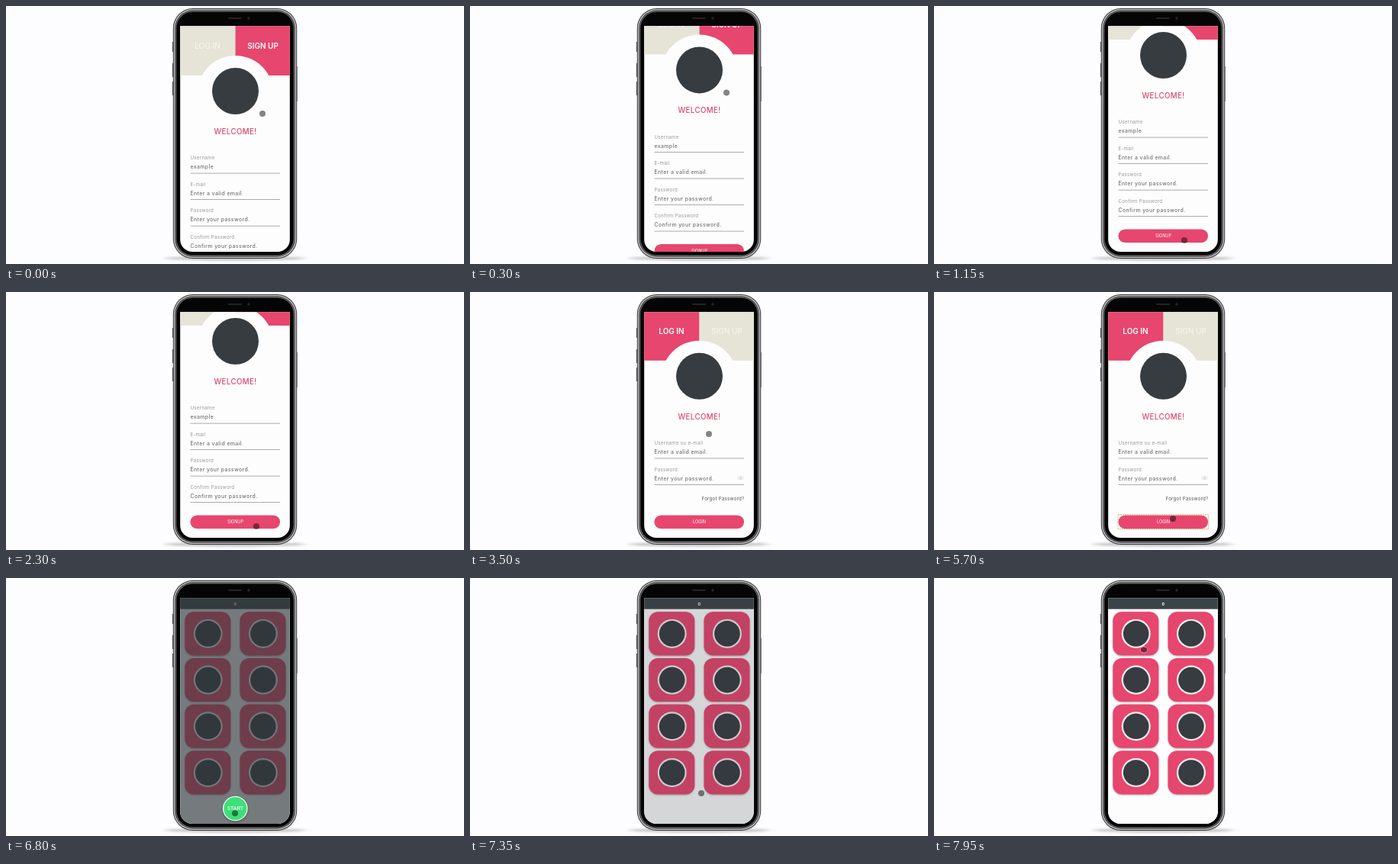
Write an HTML page that moves like this. It is 600 px wide and 338 px high and loops after 8000 ms.

```html
<!DOCTYPE html>
<html lang="en">
<head>
<meta charset="utf-8">
<title>Sign up, log in, play</title>
<style>
html, body { margin: 0; width: 100%; height: 100%; overflow: hidden; background: #fdfcfe; }
svg { display: block; width: 100vw; height: 100vh; }
text { font-family: Inter, "Open Sans", sans-serif; }
.tab { font-size: 10px; fill: #f8f7f0; text-anchor: middle; }
.on { font-weight: 600; fill: #fff; }
.hello { font-size: 9.7px; font-weight: 500; letter-spacing: .4px; fill: #d8486b; text-anchor: middle; }
.label { font-size: 6.2px; letter-spacing: .25px; fill: #98969a; }
.value { font-size: 6.9px; font-weight: 500; letter-spacing: .4px; fill: #727074; }
.forgot { font-size: 6.2px; letter-spacing: .22px; fill: #555; text-anchor: end; }
.button { font-size: 5.6px; fill: #fff; text-anchor: middle; }
.score { font: 700 6px Roboto, sans-serif; fill: #fff; text-anchor: middle; }
.start { font: 500 7px Roboto, sans-serif; fill: #e2ffe9; text-anchor: middle; }
</style>
</head>
<body>
<svg viewBox="0 0 600 338">
  <defs>
    <clipPath id="screen"><path d="M228.200 26.300H371.800V306a16 16 0 0 1-16 16H244.200a16 16 0 0 1-16-16Z"/></clipPath>
    <filter id="soft" x="-20%" y="-200%" width="140%" height="500%"><feGaussianBlur stdDeviation="5 1.500"/></filter>
    <filter id="blur" x="-10%" y="-10%" width="120%" height="120%"><feGaussianBlur stdDeviation="1"/></filter>
  </defs>
  <rect width="600" height="338" fill="#fdfcfe"/>
  <ellipse cx="300" cy="330.500" rx="92" ry="3" fill="#777" opacity=".42" filter="url(#soft)"/>
  <path d="M218.500 47v13M218.500 75v18M218.500 99v18M381 79v46" stroke="#555" stroke-width="1.200"/>
  <g id="body"></g>
  <rect x="291" y="15" width="18" height="2" rx="1" fill="#252528"/>
  <circle cx="318" cy="16" r="1.700" fill="#25283a"/>
  <g clip-path="url(#screen)">
    <rect x="228" y="26" width="144" height="297" fill="#fefdfe"/>
    <g id="signup"></g>
    <g id="login"></g>
    <g id="game"></g>
    <ellipse id="cursor" fill="#000" fill-opacity=".48" stroke="#f3a9bc"/>
  </g>
</svg>
<script>
const LOOP = 8000, PINK = '#e7466e', BEIGE = '#e6e4d7', DARK = '#363c40';
const $ = id => document.getElementById(id);
const text = (cls, x, y, s) => `<text class="${cls}" x="${x}" y="${y}">${s}</text>`;
const rect = (x, y, w, h, fill, rest = '') =>
  `<rect x="${x}" y="${y}" width="${w}" height="${h}" fill="${fill}" ${rest}/>`;
const disc = (x, y, r, fill, rest = '') => `<circle cx="${x}" cy="${y}" r="${r}" fill="${fill}" ${rest}/>`;

// Shells of the phone, from the rim inwards: [inset, colour].
$('body').innerHTML = [
  [0, '#3c3c3f'], [1, '#b9b9bc'], [2.600, '#2c2c2e'], [3.600, '#858588'], [4.400, '#050505']
].map(([d, fill]) =>
  rect(218.800 + d, 3 + d, 162.400 - 2 * d, 328 - 2 * d, fill, `rx="${26 - d}"`)).join('');

const header = login =>
  rect(228, 26, 72.500, 65, login ? PINK : BEIGE) +
  rect(300.500, 26, 72, 65, login ? BEIGE : PINK) +
  disc(300.500, 115, 50, '#fefdfe') + disc(300.500, 111.500, 30.500, DARK) +
  text(login ? 'tab on' : 'tab', 264, 56, 'LOG IN') +
  text(login ? 'tab' : 'tab on', 336.500, 56, 'SIGN UP') +
  text('hello', 300.500, 168, 'WELCOME!');

const field = ([label, value], i) => {
  const y = 34.500 * i;
  return text('label', 241.500, 201.300 + y, label) + text('value', 241.500, 213.300 + y, value) +
    rect(241.500, 218.700 + y, 117.500, .8, '#97959a');
};

const button = (y, label) =>
  rect(241.500, y, 117.500, 17.500, PINK, 'rx="8.750"') + text('button', 300.500, y + 10.800, label);

$('signup').innerHTML = header(false) + [
  ['Username', 'example'],
  ['E-mail', 'Enter a valid email.'],
  ['Password', 'Enter your password.'],
  ['Confirm Password', 'Confirm your password.']
].map(field).join('') + button(339.500, 'SIGNUP');

$('login').innerHTML = header(true) + [
  ['Username ou e-mail', 'Enter a valid email.'],
  ['Password', 'Enter your password.']
].map(field).join('') +
  '<path d="M350.500 245q4-4.500 8 0q-4 4.500-8 0Z" fill="none" stroke="#ccc" stroke-width=".7"/>' +
  disc(354.500, 245, 1.200, '#ccc') +
  text('forgot', 359.500, 274.200, 'Forgot Password?') + button(293.700, 'LOGIN') +
  rect(241, 293, 118.500, 18.700, 'none',
    'id="focus" stroke="#e39a4a" stroke-width=".8" stroke-dasharray="2 1"');

const card = (_, i) => {
  const x = 234.300 + i % 2 * 72.200, y = 44.200 + (i >> 1) * 60.700;
  return rect(x, y + 1, 60, 57.200, '#777', 'rx="12" opacity=".55" filter="url(#blur)"') +
    rect(x, y, 60, 57.200, PINK, 'rx="12"') +
    disc(x + 30.400, y + 28.700, 19, '#f3eff0') + disc(x + 30.400, y + 28.700, 16.800, DARK);
};

$('game').innerHTML = rect(228, 26, 144, 297, '#fefdfe') +
  Array.from({ length: 8 }, card).join('') +
  rect(228, 26, 144, 14.700, '#3a4348') + text('score', 300.300, 35.500, '0') +
  rect(228, 26, 144, 297, '#30373b', 'id="shade"') +
  '<g id="start">' + disc(300.300, 303, 16.500, '#333', 'opacity=".5" filter="url(#blur)"') +
  disc(300.300, 302, 15.700, '#3edf79', 'stroke="#f2fff5" stroke-width="1.300"') +
  text('start', 300.300, 304.300, 'START') + '</g>';

const ease = p => p * p * (3 - 2 * p);
const linear = p => p;

// Keys are [time, value, ...]; returns the values at time t.
function track(keys, t, curve = ease) {
  const i = keys.findIndex(k => k[0] > t);
  if (i === 0) return keys[0].slice(1);
  if (i < 0) return keys[keys.length - 1].slice(1);
  const a = keys[i - 1], b = keys[i], p = curve((t - a[0]) / (b[0] - a[0]));
  return a.slice(1).map((v, k) => v + (b[k + 1] - v) * p);
}

const LOGIN_AT = 2600, FOCUS_AT = 4650, GAME_AT = 6100, TAP_AT = 7900;
const pointer = [
  [50, 336, 141], [500, 336, 94], [1050, 328, 307], [3050, 328, 307], [3480, 313, 186],
  [3950, 313, 186], [4550, 313, 297], [6150, 313, 297], [6650, 300, 308.300],
  [6900, 300, 308.300], [7350, 303, 282], [TAP_AT, 275, 94]
];
const scroll = [[50, 0], [500, 47]];
const loginScroll = 1.200; // the shorter page clamps the scroll
const shade = [[GAME_AT, 0], [6350, .66], [6950, .66], [7520, 0]];
const start = [[GAME_AT, 0], [6350, 1], [6900, 1], [7150, 0]];

const set = (id, attrs) => {
  for (const k in attrs) $(id).setAttribute(k, attrs[k]);
};
const show = (id, on) => set(id, { display: on ? 'inline' : 'none' });
const shift = (id, dy) => set(id, { transform: `translate(0 ${-dy})` });

function draw(t) {
  const [cx, cy] = track(pointer, t), tap = t >= TAP_AT;
  show('signup', t < LOGIN_AT);
  show('login', t >= LOGIN_AT && t < GAME_AT);
  show('game', t >= GAME_AT);
  show('focus', t >= FOCUS_AT);
  shift('signup', track(scroll, t)[0]);
  shift('login', loginScroll);
  set('shade', { opacity: track(shade, t, linear)[0] });
  set('start', { opacity: track(start, t)[0] });
  set('cursor', { cx, cy, rx: tap ? 4.800 : 4, ry: 4, 'stroke-width': tap ? .8 : 0 });
}

const t0 = performance.now();
function tick() {
  draw((performance.now() - t0) % LOOP);
  requestAnimationFrame(tick);
}
tick();
</script>
</body>
</html>
```
